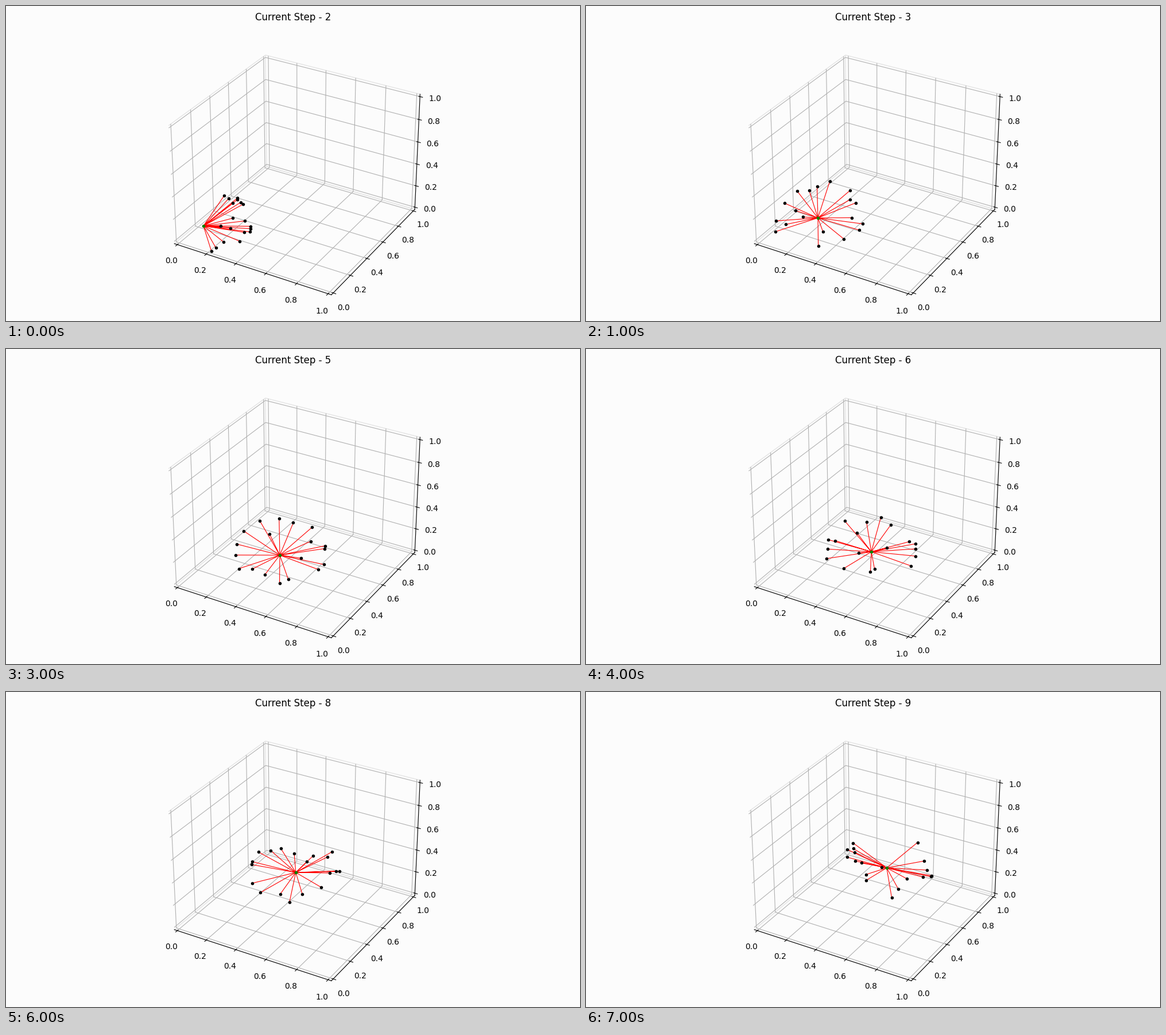
These frames come from a looping animation (1000 by 550 pixels, 8000 ms). A matplotlib script:

```python
import numpy as np
import matplotlib.pyplot as plt
from matplotlib.animation import FuncAnimation

WIDTH, HEIGHT, DPI = 1000, 550, 100
BACKGROUND = "#fcfcfc"
SIDE, PAD = 487, 15  # square plot area and its bottom margin, in pixels
REACH, PROBES = 0.28, 19
FIRST_STEP = 2

# One stop per step: hub position, and the compass range (degrees) it probes
WALK = [
    ((0.054, 0.176, 0.03), (-55, 100)),
    ((0.182, 0.353, 0.03), (0, 360)),
    ((0.310, 0.390, 0.03), (0, 360)),
    ((0.364, 0.533, 0.03), (0, 360)),
    ((0.404, 0.601, 0.03), (0, 360)),
    ((0.383, 0.712, 0.10), (0, 360)),
    ((0.340, 0.765, 0.10), (0, 360)),
    ((0.370, 0.846, 0.10), (163, 422)),
]

plt.rcParams["font.family"] = "DejaVu Sans"


def make_box(fig):
    rect = [(WIDTH - SIDE) / 2 / WIDTH, PAD / HEIGHT, SIDE / WIDTH, SIDE / HEIGHT]
    box = fig.add_axes(rect, projection="3d", facecolor=BACKGROUND)
    limits = (-1 / 48, 49 / 48)
    box.set(xlim=limits, ylim=limits, zlim=limits)
    for axis in (box.xaxis, box.yaxis, box.zaxis):
        axis.set_ticks(np.linspace(0, 1, 6))
        axis.set_pane_color(BACKGROUND)
        axis.pane.set_fill(False)
        axis.pane.set_edgecolor("#e4e4e4")
    return box


def probe_ends(hub, fan, seed):
    """Equal-length probes spread over the fan, kept inside the unit cube."""
    rng = np.random.default_rng(seed)
    share = (np.arange(PROBES) + rng.uniform(0, 1, PROBES)) / PROBES
    turn = np.radians(fan[0] + share * (fan[1] - fan[0]))
    rise = rng.uniform(-0.3, 0.7, PROBES)
    flat = np.sqrt(1 - rise ** 2)
    heading = np.column_stack([flat * np.cos(turn), flat * np.sin(turn), rise])
    return np.clip(hub + REACH * heading, 0, 1)


fig = plt.figure(figsize=(WIDTH / DPI, HEIGHT / DPI), dpi=DPI,
                 facecolor=BACKGROUND)
box = make_box(fig)
title = fig.suptitle("", fontsize=12)
rays, = box.plot([], [], [], color="red", lw=0.8)
dots, = box.plot([], [], [], "k.", ms=6)
hub_dot, = box.plot([], [], [], ".", color="green", ms=6)


def draw(frame):
    step = FIRST_STEP + frame
    hub, fan = np.array(WALK[frame][0]), WALK[frame][1]
    ends = probe_ends(hub, fan, seed=step)

    # hub, end, gap for every probe
    path = np.full((PROBES, 3, 3), np.nan)
    path[:, 0], path[:, 1] = hub, ends
    rays.set_data_3d(*path.reshape(-1, 3).T)
    dots.set_data_3d(*ends.T)
    hub_dot.set_data_3d(*hub[:, None])
    title.set_text(f"Current Step - {step}")
    return rays, dots, hub_dot, title


animation = FuncAnimation(fig, draw, frames=len(WALK), interval=1000,
                          repeat=True, repeat_delay=0)
plt.show()
```
